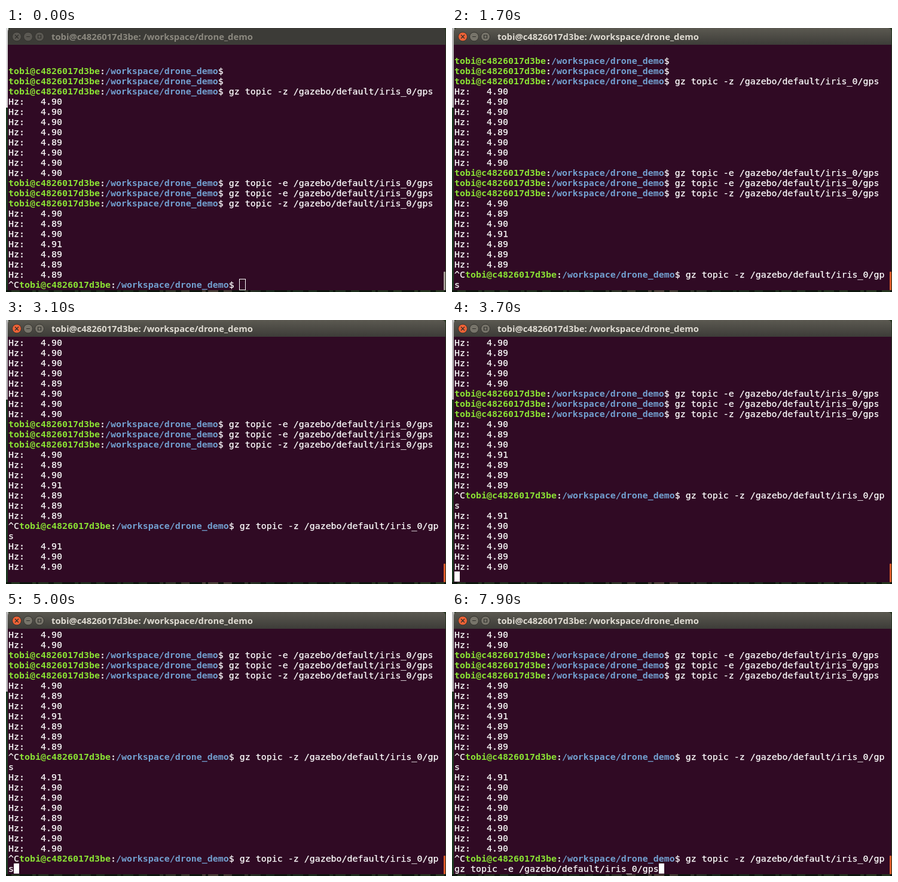
Recreate the animation shown at these times as an HTML page. Size 736 by 441 pixels, loop 8000 ms.

```html
<!DOCTYPE html>
<html lang="en">
<head>
<meta charset="utf-8">
<title>Terminal</title>
<style>
  html, body { margin: 0; width: 100%; height: 100%; overflow: hidden; background: #1c2a1c; }
  svg { display: block; }
  .term text { font: 14.95px "DejaVu Sans Mono", monospace; fill: #fff; stroke: #fff; stroke-width: .25; white-space: pre; }
  .term tspan { font-weight: bold; stroke: none; }
  .term .user { fill: #8ae234; }
  .term .path { fill: #729fcf; }
  #title { font: bold 14.8px "Noto Sans", "Open Sans", sans-serif; }
</style>
</head>
<body>
<svg width="736" height="441" viewBox="0 0 736 441">
  <defs>
    <linearGradient id="active" x2="0" y2="1">
      <stop offset="0" stop-color="#5b5951"/>
      <stop offset="1" stop-color="#3d3c38"/>
    </linearGradient>
    <linearGradient id="desk">
      <stop offset="0" stop-color="#23331f"/>
      <stop offset=".3" stop-color="#182a19"/>
      <stop offset=".48" stop-color="#4a4038"/>
      <stop offset=".6" stop-color="#16271a"/>
      <stop offset="1" stop-color="#26361f"/>
    </linearGradient>
  </defs>
  <rect width="736" height="441" fill="url(#desk)"/>
  <path d="M0 439.500H736" stroke="#0d150d" stroke-width="3" stroke-dasharray="9 14 21 6 4 17"/>
  <rect id="side" width="4" height="133"/>
  <rect y="133" width="3" height="305" fill="#1d3a22"/>
  <rect x="3" y="20" width="732" height="418" fill="#300a24"/>
  <path id="bar" d="M3 28V6Q3 0 9 0H729Q735 0 735 6V28Z"/>
  <g stroke="#33322e">
    <circle id="close" cx="18" cy="14.5" r="7.5"/>
    <circle class="btn" cx="37" cy="14.5" r="7.5"/>
    <circle class="btn" cx="56" cy="14.5" r="7.5"/>
  </g>
  <path d="M15 11.500l6 6m0-6l-6 6M34 14.500h6M53.500 12h5v5h-5z" fill="none" stroke="#2f2e2a" stroke-width="1.2"/>
  <text id="title" x="76" y="20"></text>
  <g class="term" id="rows"></g>
  <rect id="cursor" stroke="#fff"/>
  <rect id="thumb" x="732" y="407" width="3" height="31" rx="1"/>
  <g id="pointer" fill="none">
    <path d="M-3 -6.500H3M0 -6.500V6.500M-3 6.500H3" stroke="#16040f" stroke-width="2.400"/>
    <path d="M-3 -6.500H3M0 -6.500V6.500M-3 6.500H3" stroke="#ddd" stroke-width="1.100"/>
  </g>
</svg>
<script>
const LOOP = 8000, ROWS = 24, CELL_W = 9, CELL_H = 17, LEFT = 4, TOP = 29;
const user = 'tobi@c4826017d3be', path = '/workspace/drone_demo';
const prompt = `${user}:${path}$ `;
const gz = flag => `gz topic -${flag} /gazebo/default/iris_0/gps`;
const hz = (...cents) => cents.map(c => 'Hz:   4.' + c);
const wrapped = ['^C' + prompt + gz('z').slice(0, -1), 's'];

const log = [
  '', '', prompt, prompt, prompt + gz('z'),
  ...hz(90, 90, 90, 90, 89, 90, 90, 90),
  prompt + gz('e'), prompt + gz('e'), prompt + gz('z'),
  ...hz(90, 89, 90, 91, 89, 89, 89),
  ...wrapped,
  ...hz(91, 90, 90, 90, 89, 90, 90, 90),
  wrapped[0]
];

// [time, log line being written, its text, cursor column or -1 when blinked off]
const steps = [
  [0, 23, '^C' + prompt, 43],
  [1100, 24, 's', 1],
  [1700, 24, 's', -1],
  [2200, 25, '', 0],
  [3100, 28, '', -1],
  [3400, 29, '', -1],
  [3500, 29, '', 0],
  [3600, 30, '', 0],
  [3700, 31, '', 0],
  [4000, 32, '', 0],
  [4100, 32, '', -1],
  [4200, 33, '', 0],
  [4400, 33, '^C', 2],
  [4600, 33, '^C' + prompt, 43],
  [4900, 34, 's', 1],
  [5300, 34, 'e', 28],
  [5900, 34, 'e', -1],
  [6400, 34, 'z', 28],
  [7000, 34, 'e', 28],
  [7200, 34, 'z', 28],
  [7300, 34, '', 0],
  [7700, 34, gz('z'), 38],
  [7900, 34, gz('e'), 38]
];

const $ = id => document.getElementById(id);
const set = (el, attrs) => { for (const k in attrs) el.setAttribute(k, attrs[k]); };

const rows = Array.from({ length: ROWS }, (_, i) => {
  const el = document.createElementNS('http://www.w3.org/2000/svg', 'text');
  set(el, { x: LEFT, y: TOP + 14 + i * CELL_H });
  return $('rows').appendChild(el);
});
$('title').textContent = `${user}: ${path}`;

const paint = line => line.replace(`${user}:${path}`,
  `<tspan class="user">${user}</tspan>:<tspan class="path">${path}</tspan>`);

function drawWindow(focused) {
  set($('bar'), { fill: focused ? 'url(#active)' : '#3c3b37' });
  set($('title'), { fill: focused ? '#dfdbd2' : '#8b887f' });
  set($('close'), { fill: focused ? '#ee6236' : '#5a5852' });
  document.querySelectorAll('.btn').forEach(b => set(b, { fill: focused ? '#77746a' : '#5a5852' }));
  set($('thumb'), { fill: focused ? '#dd5a2b' : '#a79c97' });
  set($('side'), { fill: focused ? '#b9b9b9' : '#dedede' });
}

function drawPointer(t) {
  const [x, y] = t < 400 ? [155.5, 67.5] : [206.5, 131.5];
  set($('pointer'), {
    transform: `translate(${x} ${y})`,
    visibility: t >= 300 && t < 1100 ? 'visible' : 'hidden'
  });
}

function drawText([, last, tail, col], focused) {
  const first = last - ROWS + 1;
  rows.forEach((el, i) => { el.innerHTML = paint(i < ROWS - 1 ? log[first + i] : tail); });
  // The hollow cursor's outline lies just outside its cell.
  const inset = focused ? .5 : -.5;
  set($('cursor'), {
    x: LEFT + col * CELL_W + inset, y: TOP + (ROWS - 1) * CELL_H + inset,
    width: CELL_W - 2 * inset, height: CELL_H - 2 * inset,
    fill: focused ? '#fff' : 'none',
    visibility: col < 0 ? 'hidden' : 'visible'
  });
}

let shown = '';
function render(t) {
  const step = steps.findLast(s => s[0] <= t);
  const focused = t >= 900;
  drawPointer(t);
  const key = step[0] + '/' + focused;
  if (key === shown) return;
  shown = key;
  drawWindow(focused);
  drawText(step, focused);
}

const start = performance.now();
function tick() {
  render((performance.now() - start) % LOOP);
  requestAnimationFrame(tick);
}
tick();
</script>
</body>
</html>
```
